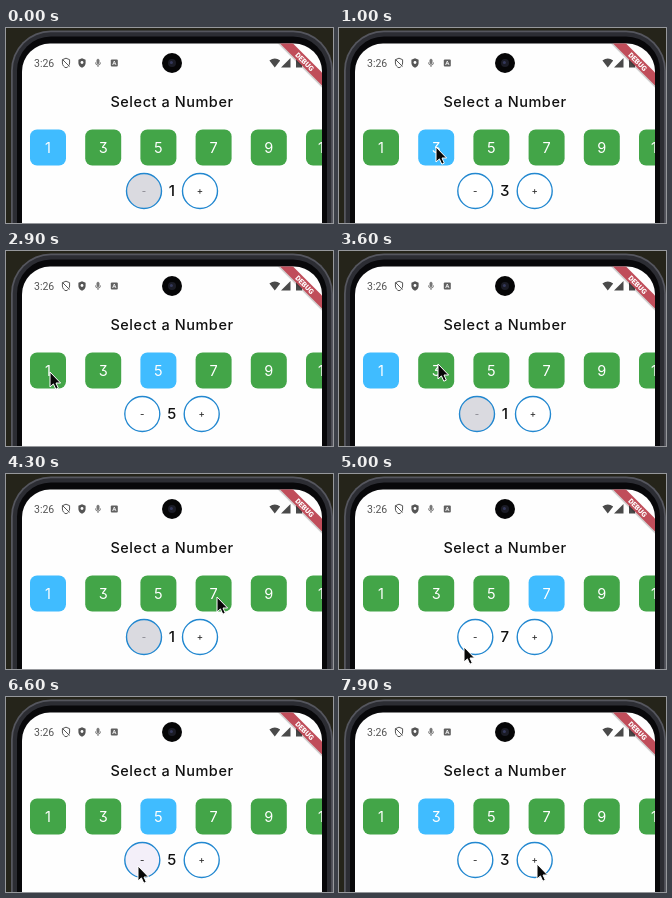
An HTML page for the animation above (8 s loop, 327 px wide and 195 px high).

```html
<!DOCTYPE html>
<html lang="en">
<head>
<meta charset="utf-8">
<title>Number selector</title>
<style>
  html, body { margin: 0; width: 100%; height: 100%; overflow: hidden; background: #25241a; }
  svg { display: block; width: 100%; height: 100%; }
  text { font-family: Montserrat, Inter, sans-serif; font-weight: 500; font-feature-settings: "cv09"; text-anchor: middle; }
  .title { font-size: 14.5px; letter-spacing: .55px; fill: #111; }
  .clock { font: 400 10.5px Roboto, sans-serif; fill: #555; text-anchor: start; }
  .tile rect { fill: #43a548; }
  .tile.on rect { fill: #40bcff; }
  .tile text { font-size: 14.5px; font-weight: 400; fill: #fff; }
  .step circle { fill: #fff; stroke: #2388d0; stroke-width: 1.4; }
  .step text { font-size: 9.5px; fill: #333; }
  .step.pressed circle { fill: #f3eff9; }
  .step.off circle { fill: #dadae0; }
  .step.off text { fill: #8b8a92; }
  #value { font-size: 15px; fill: #111; }
  .banner { font: 900 7.2px Roboto, sans-serif; fill: #fff; }
</style>
</head>
<body>
<svg viewBox="0 0 327 195" preserveAspectRatio="none">
  <defs>
    <clipPath id="screen"><rect x="16" y="15.5" width="300" height="220" rx="28"/></clipPath>
    <path id="shield" d="M0-4.8 3.6-3.3V0C3.6 2.3 2 4 0 4.8-2 4-3.6 2.3-3.6 0V-3.3Z"/>
  </defs>

  <!-- Phone body -->
  <rect width="327" height="195" fill="#25241a"/>
  <rect x="5" y="2.5" width="322" height="260" rx="40" fill="#55565e"/>
  <rect x="6.8" y="4.3" width="318.4" height="260" rx="38" fill="#2c2d33"/>
  <rect x="11" y="8.5" width="310" height="260" rx="34" fill="#08080a"/>

  <g clip-path="url(#screen)">
    <rect x="16" y="15" width="300" height="180" fill="#fefefe"/>

    <!-- Status bar -->
    <text class="clock" x="28" y="39">3:26</text>
    <g fill="none" stroke="#555" stroke-width="1">
      <use href="#shield" x="60" y="35"/>
      <path d="M56.5 31.5 63.5 38.5"/>
    </g>
    <use href="#shield" x="76" y="35" fill="#555"/>
    <circle cx="76" cy="34.5" r="1.4" fill="#fff"/>
    <g fill="none" stroke="#777" stroke-width="1">
      <rect x="91" y="31.2" width="2" height="4.5" rx="1" fill="#777"/>
      <path d="M89.5 34.5a2.5 2.6 0 0 0 5 0M92 37.1V39"/>
    </g>
    <rect x="104.8" y="31.5" width="7" height="7" rx="1" fill="#606060"/>
    <path d="M106.6 37 108.3 33 110 37M107.2 35.7H109.4" fill="none" stroke="#fff" stroke-width=".8"/>
    <path d="M263.4 32.5Q268.8 28.4 274.2 32.5L268.8 39.5Z" fill="#4a4a4a"/>
    <path d="M284.5 30V39.5H275Z" fill="#4a4a4a"/>
    <path d="M290 31H291.6V29.8H294.4V31H296V39.5H290Z" fill="#4a4a4a"/>

    <circle cx="166" cy="35" r="10" fill="#060607"/>
    <circle cx="166" cy="35" r="4" fill="#1b1c26"/>
    <circle cx="165.4" cy="34.4" r="1.5" fill="#34385a"/>

    <text class="title" x="166" y="78.7">Select a Number</text>
    <g id="tiles"></g>

    <g class="step" id="minus"><circle r="17.5"/><text y="3.4">-</text></g>
    <text id="value" x="165.8" y="168.2"></text>
    <g class="step" id="plus"><circle r="17.5"/><text y="3.4">+</text></g>

    <g transform="translate(298.7 33.7) rotate(45)">
      <rect x="-40" y="-3.6" width="80" height="9.8" fill="#000" opacity=".18"/>
      <rect x="-40" y="-4.6" width="80" height="9.2" fill="#c04d5a"/>
      <text class="banner" y="2.6">DEBUG</text>
    </g>
  </g>

  <path id="cursor" d="M0 0V15L3.4 11.9 5.8 17.2 8.3 16.1 6 11H10.6Z"
        fill="#080808" stroke="#fff" stroke-width="1" stroke-linejoin="round"/>
</svg>

<script>
const LOOP = 8000, FRAME = 100;
const $ = id => document.getElementById(id);

// [time, selected number]
const picks = [[0, 1], [800, 3], [1900, 5], [3000, 1], [4400, 7], [6300, 5], [7100, 3]];

// [time, x, y] of the pointer tip
const path = [
  [400, 113, 196], [800, 97, 119], [1300, 97, 119], [1800, 160, 125],
  [2300, 160, 125], [2800, 44, 121], [3200, 44, 121], [3600, 99, 113],
  [4200, 211, 123], [4600, 211, 123], [5000, 125, 173], [5400, 132, 169],
  [7300, 132, 169], [7700, 198, 167], [8000, 198, 167]
];

// Spans in which the minus button shows its pressed tint
const presses = [[6200, 6700], [7000, 7300]];

const tiles = [1, 3, 5, 7, 9, 11].map((n, i) => {
  const x = 24 + i * 55.2;
  $("tiles").insertAdjacentHTML("beforeend",
    `<g class="tile"><rect x="${x}" y="101.5" width="36" height="36" rx="7"/>
     <text x="${x + 18}" y="124.5">${n}</text></g>`);
  return { n, el: $("tiles").lastElementChild };
});

const ease = p => p * p * (3 - 2 * p);

function pointerAt(t) {
  const i = path.findIndex(k => k[0] > t);
  if (i < 1) return null;
  const [t0, x0, y0] = path[i - 1], [t1, x1, y1] = path[i];
  const p = ease((t - t0) / (t1 - t0));
  return [x0 + (x1 - x0) * p, y0 + (y1 - y0) * p];
}

function draw() {
  const t = Math.floor(performance.now() % LOOP / FRAME) * FRAME;
  const value = picks.filter(k => k[0] <= t).pop()[1];
  const reach = value === 1 ? 28 : 29.7;

  tiles.forEach(({ n, el }) => el.classList.toggle("on", n === value));
  $("value").textContent = value;
  $("minus").setAttribute("transform", `translate(${166 - reach} 163)`);
  $("plus").setAttribute("transform", `translate(${166 + reach} 163)`);
  $("minus").classList.toggle("off", value === 1);
  $("minus").classList.toggle("pressed", presses.some(([a, b]) => t >= a && t < b));

  const tip = pointerAt(t);
  $("cursor").style.display = tip ? "" : "none";
  if (tip) $("cursor").setAttribute("transform", `translate(${tip})`);
  requestAnimationFrame(draw);
}
draw();
</script>
</body>
</html>
```
